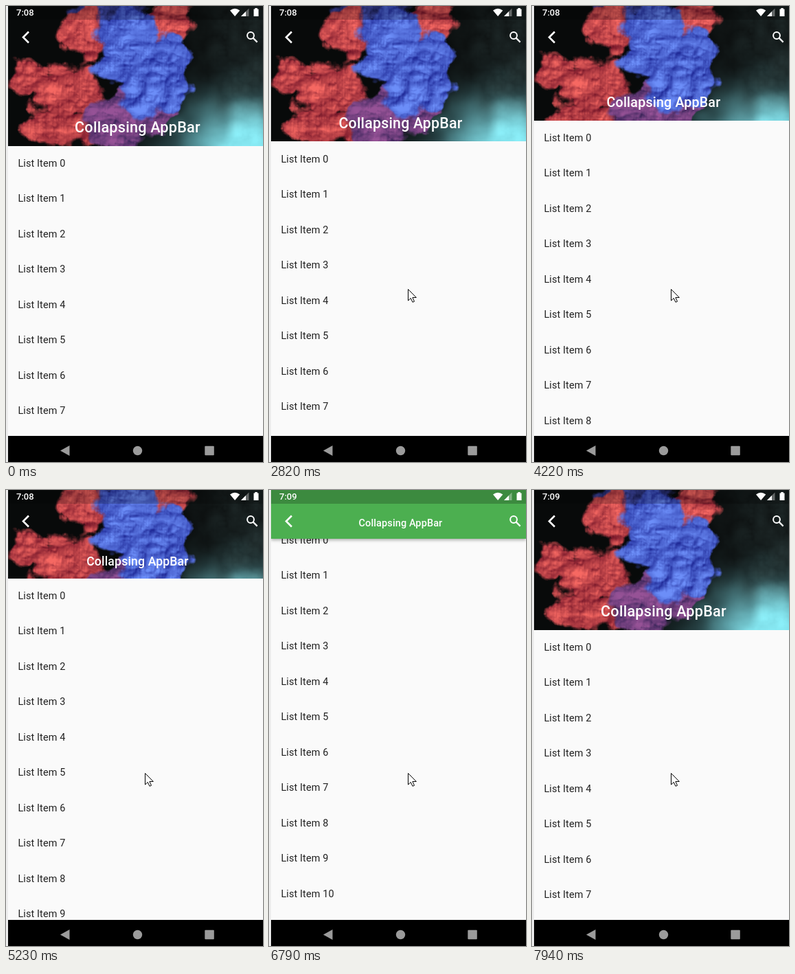
These frames come from a looping animation (374 by 664 pixels, 8 s). An HTML page with a canvas:

```html
<!DOCTYPE html>
<html lang="en">
<head>
<meta charset="utf-8">
<title>Collapsing AppBar</title>
<style>
html, body { margin: 0; width: 100%; height: 100%; overflow: hidden; background: #ededed; }
#stage { position: relative; width: 374px; height: 664px; overflow: hidden; font-family: Roboto, sans-serif; }
#page { position: absolute; left: 3px; top: 0; width: 371px; height: 626px; overflow: hidden; background: #fafafa; }
#bar { position: absolute; left: 0; top: 0; width: 371px; background: #4caf50; }
#bar.raised { box-shadow: 0 2px 4px rgba(0,0,0,.24), 0 1px 7px rgba(0,0,0,.12); }
#clip { position: absolute; inset: 0; overflow: hidden; }
#photo { position: absolute; left: 0; top: 0; }
#list { position: absolute; left: 0; top: 0; }
#list div { position: absolute; left: 14.4px; font-size: 14.44px; line-height: 18px; letter-spacing: .12px; color: #212121; white-space: nowrap; }
svg { position: absolute; left: 0; top: 0; }
</style>
</head>
<body>
<div id="stage">
  <div id="page">
    <div id="list"></div>
    <div id="bar"><div id="clip"><canvas id="photo" width="371" height="204"></canvas></div></div>
  </div>
  <svg width="374" height="664" viewBox="0 0 374 664" fill="#fff">
    <rect x="3" width="371" height="20" fill="#000" opacity=".21"/>
    <text id="clock" x="15" y="14" font-size="13" font-weight="500"></text>
    <path d="M326 6.5Q333 .8 340.3 6.5L333.1 15Z"/>
    <path d="M342 15L353.5 3.5V15Z" opacity=".35"/>
    <path d="M342 15L349 8V15Z"/>
    <path d="M360.500 4.500H362.300V3H365.700V4.500H367.500V15H360.500Z"/>
    <path d="M33 37.500L25 45.500L33 53.500" fill="none" stroke="#fff" stroke-width="2.6"/>
    <g fill="none" stroke="#fff" stroke-width="2">
      <circle cx="356" cy="43" r="4.9"/>
      <path d="M359.600 46.600L365.600 52.600" stroke-width="2.2"/>
    </g>
    <text id="title" text-anchor="middle" font-size="14.44" font-weight="500" letter-spacing=".14">Collapsing AppBar</text>
    <rect x="3" y="626" width="371" height="38" fill="#000"/>
    <g fill="#9b9b9b">
      <path d="M79 647.500L92.500 640V655Z"/>
      <circle cx="191.500" cy="647.500" r="6.700"/>
      <rect x="289.300" y="640.800" width="13.500" height="13.500" rx="1"/>
    </g>
    <path id="cursor" d="M0 0V16.500L3.800 13L6.500 18.800L9 17.700L6.400 12H11.800Z" stroke="#000" stroke-linejoin="round"/>
  </svg>
</div>
<script>
const $ = id => document.getElementById(id);
const LOOP = 8000, STEP = 77;
const MAX = 203.5, MIN = 70.5, TOOLBAR = 50.5, ROW = 51.45, ROWS = 13;
const RANGE = MAX - MIN;

// Each drag: start time, number of steps, scroll offset at its end
const drags = [
  [2820, 3, 11], [3600, 1, 20], [4060, 3, 37], [4680, 2, 56], [5230, 3, 90], [5690, 2, 108],
  [6010, 5, 147], [6710, 3, 157], [7170, 2, 137], [7480, 1, 113.5], [7630, 5, 0]
];

const clamp = v => Math.min(1, Math.max(0, v));
const mix = (a, b, k) => a + (b - a) * k;

// Stepped ease-out: 0 before the start, 1 after n steps
function ease(t, start, n) {
  const k = clamp((Math.floor((t - start) / STEP) + 1) / n);
  return 1 - (1 - k) ** 2;
}

const offset = t => drags.reduce((s, [start, n, to]) => mix(s, to, ease(t, start, n)), 0);

// Two-colour ink: light and shaded
const inks = {
  navy: [[70, 80, 180], [18, 22, 70]],
  red: [[246, 104, 98], [120, 24, 42]],
  plum: [[150, 82, 150], [62, 38, 92]],
  blue: [[108, 142, 248], [30, 40, 150]]
};
// Ink clouds from back to front: ink, centre, radii
const clouds = [
  ['navy', 150, 8, 52, 20], ['red', 118, 42, 38, 36], ['red', 238, 20, 34, 36],
  ['red', 30, 106, 30, 26], ['red', 85, 125, 50, 44], ['red', 82, 178, 58, 28],
  ['plum', 165, 165, 42, 40], ['plum', 222, 156, 26, 20], ['blue', 180, 36, 44, 34],
  ['blue', 198, 84, 62, 46], ['blue', 212, 122, 48, 36], ['blue', 240, 88, 30, 38]
];

function hash(x, y) {
  const v = Math.sin(x * 127.1 + y * 311.7) * 43758.5453;
  return v - Math.floor(v);
}

function noise(x, y) {
  const i = Math.floor(x), j = Math.floor(y);
  const smooth = v => v * v * (3 - 2 * v);
  const u = smooth(x - i), v = smooth(y - j);
  return mix(mix(hash(i, j), hash(i + 1, j), u), mix(hash(i, j + 1), hash(i + 1, j + 1), u), v);
}

// Rounded bumps with sharp creases
function billow(x, y) {
  let sum = 0;
  for (let o = 0, f = 1 / 30; o < 4; o++, f *= 2)
    sum += Math.abs(2 * noise(x * f + o * 9, y * f) - 1) / 2 ** o;
  return sum / 1.1;
}

function drawPhoto() {
  const c = $('photo').getContext('2d');
  const { width: w, height: h } = c.canvas;
  const img = c.createImageData(w, h);
  for (let y = 0; y < h; y++) for (let x = 0; x < w; x++) {
    const b = billow(x, y);
    const slope = b - billow(x + 1.5, y + 3);
    const shade = clamp(.32 + b * .5 + slope * 1.1);
    const wx = x + 3 + 26 * (noise(x / 24, y / 24) - .5);
    const wy = y + 26 * (noise(x / 24 + 50, y / 24) - .5);

    const glow = clamp(1.1 * Math.exp(-(((wx - 350) / 100) ** 2) - ((wy - 208) / 62) ** 2));
    const smoke = clamp((wx - 250) / 90) * (.06 + b * .1);
    let rgb = [mix(8, 120, glow) + smoke * 130, mix(10, 212, glow) + smoke * 180, mix(10, 222, glow) + smoke * 180];

    for (const [ink, cx, cy, rx, ry] of clouds) {
      const d = 1 - Math.hypot((wx - cx) / rx, (wy - cy) / ry) + (b - .4) * .35;
      const a = clamp(d / .16);
      const [light, dark] = inks[ink];
      const lit = shade * mix(.6, 1, clamp(d * 2));
      rgb = rgb.map((v, i) => mix(v, mix(dark[i], light[i], lit), a));
    }
    img.data.set([...rgb, 255], (y * w + x) * 4);
  }
  c.putImageData(img, 0, 0);
}

function buildList() {
  for (let i = 0; i < ROWS; i++) {
    const d = document.createElement('div');
    d.textContent = 'List Item ' + i;
    d.style.top = i * ROW + 'px';
    $('list').append(d);
  }
}

function render(t) {
  const s = offset(t);
  const h = Math.max(MIN, MAX - s);
  const k = (MAX - h) / RANGE;
  const zoom = 1.5 - k / 2;
  $('bar').style.height = h + 'px';
  $('bar').classList.toggle('raised', t >= 6160 && t < 7630);
  $('photo').style.top = -k * RANGE / 4 + 'px';
  $('photo').style.opacity = clamp((h - MIN) / TOOLBAR);
  $('list').style.transform = `translateY(${MAX - s + 17.4}px)`;
  $('title').setAttribute('transform', `translate(191.4 ${h - 14.4 - 3.5 * zoom}) scale(${zoom})`);
  $('clock').textContent = t < 5690 ? '7:08' : '7:09';
  const p = ease(t, 1420, 3);
  $('cursor').setAttribute('transform', `translate(${mix(237, 202.5, p)} ${mix(528, 412.5, p)})`);
  $('cursor').style.visibility = p ? 'visible' : 'hidden';
}

buildList();
drawPhoto();
const start = performance.now();
function tick() {
  render((performance.now() - start) % LOOP);
  requestAnimationFrame(tick);
}
tick();
</script>
</body>
</html>
```
